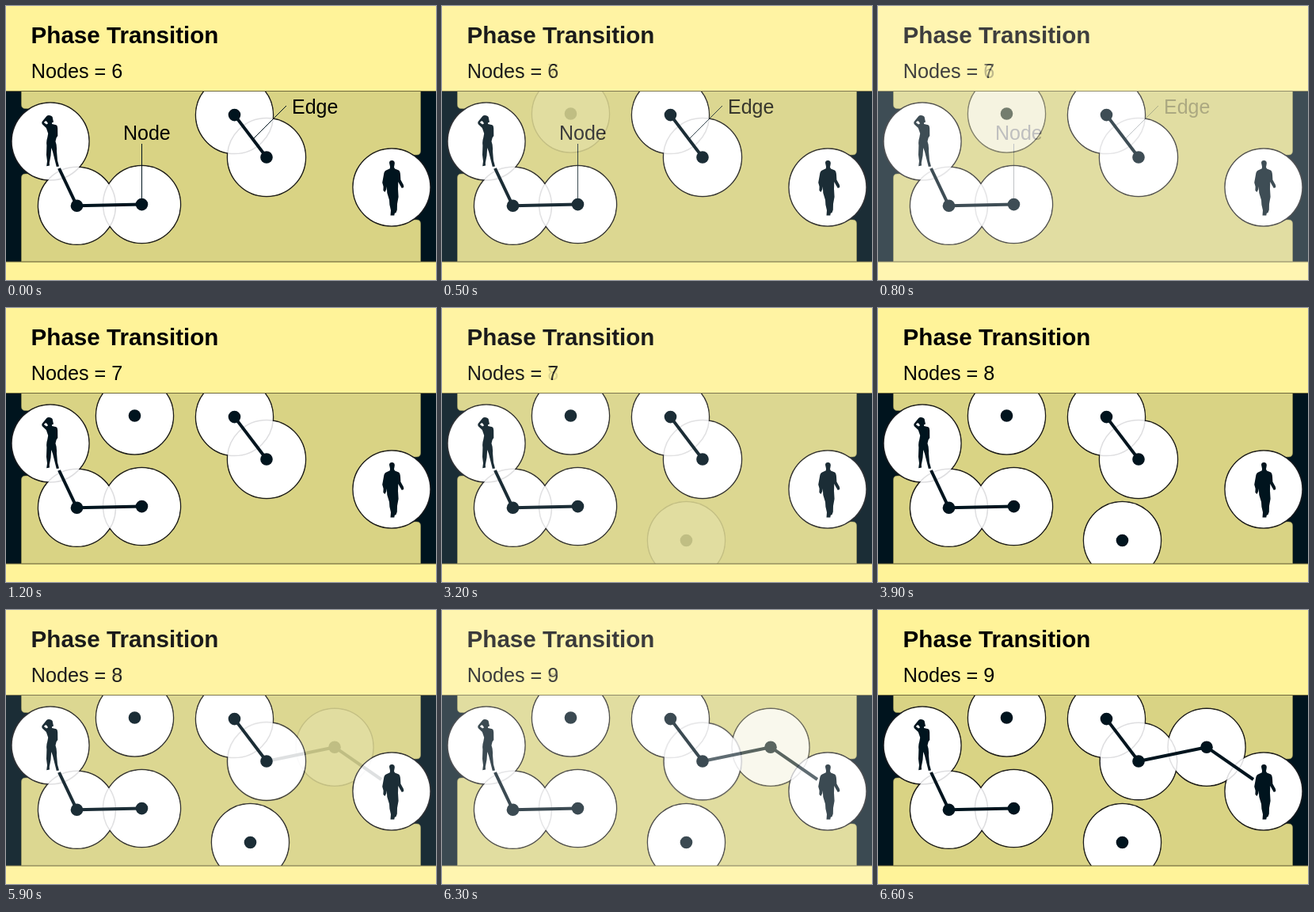
An HTML page that plays this animation: 543x346 px, repeating every 8 s.

```html
<!DOCTYPE html>
<html lang="en">
<head>
<meta charset="utf-8">
<title>Phase Transition</title>
<style>
  html, body { margin: 0; width: 100%; height: 100%; overflow: hidden; background: #fff; }
  svg { display: block; width: 543px; height: 346px; }
  text { font: 25.2px "Liberation Sans", Arial, sans-serif; }
  .title { font-size: 29.6px; font-weight: bold; }
  .label { font-size: 25px; }
</style>
</head>
<body>
<svg id="stage" viewBox="0 0 543 346"></svg>
<script>
const INK = '#00141e', YELLOW = '#fff399', KHAKI = '#d9d384', PALE = '#dedee0';
const LOOP = 8000, STEP = 100, STEPS = 8, FADES = [500, 3200, 5900];
const stage = document.getElementById('stage');

const people = [[56, 171], [487, 229]];
const nodes = [[89.5, 252.3], [171.5, 250.6], [288.5, 137.6], [329, 191],
  [162.5, 136], [308.5, 293.5], [415, 173.2]];
const edges = [[[67, 205], nodes[0]], [nodes[0], nodes[1]], [nodes[2], nodes[3]]];
const lateEdges = [[nodes[3], nodes[6]], [nodes[6], [474, 214]]];

const woman = `M50.5 140Q52 137.4 55.5 138.2Q59 138.7 59 142L60 146.5L58 147.5
  L58 149L63.5 150.2Q65.3 151 65.2 155L65.3 164L63.6 166.5L62.5 171
  Q64.5 176 64 183L65 195L67 202.5L63.8 203L62 196L59 184L57.2 179
  L56.5 189L54.8 198L55 201.5L51.2 202.3L52 196L51 188L51.4 176
  Q50.6 171 52.3 166L53.2 161L50.8 154L46 149.5Q44.5 147.5 46 145.5
  L49.3 141.5ZM47.8 147L51 149.5L53 148.5L52 146.5L50.2 145Z`;
const man = `M484 198Q484.2 194.8 487.5 195Q491 195.2 490.8 199L490 203.5L491 205.5
  L496 207.5Q497.7 208.5 498 213L498.4 219.5L502 226L502.3 229L499.8 230
  L497.7 226.5L495.3 222L495 231L495.6 241L494 250L493.8 257.5L492.5 261
  L490.8 261.8L490.3 264.5L485.5 264.5L486 258L484.4 251L484 245L481.3 236
  L480.8 228L480.3 231.5L478.5 235L476.4 233L476.6 228L475.2 223L477 213
  Q477.4 208.7 480 207.5L484.8 205.2L485 202.8Z`;

const line = ([a, b], width) =>
  `<path d="M${a}L${b}" stroke="${INK}" stroke-width="${width}"/>`;
const disc = ([x, y, r], attrs) => `<circle cx="${x}" cy="${y}" r="${r}" ${attrs}/>`;

// Outlines turn pale wherever one disc lies inside another.
function discs(list, id) {
  const each = attrs => list.map(c => disc(c, attrs)).join('');
  let inner = '';
  list.forEach((a, i) => list.forEach((b, j) => {
    if (i === j || Math.hypot(a[0] - b[0], a[1] - b[1]) > a[2] + b[2]) return;
    const clip = `${id}-${i}-${j}`;
    inner += `<clipPath id="${clip}">${disc([b[0], b[1], b[2] - 0.7], '')}</clipPath>` +
      disc(a, `fill="none" stroke="${PALE}" stroke-width="1.5" clip-path="url(#${clip})"`);
  }));
  const fills = list.map(([x, y, r]) => disc([x, y, r - 0.7], 'fill="#fff"')).join('');
  return each(`fill="none" stroke="#1a1a1e" stroke-width="1.5"`) + fills + inner;
}

function scene(index) {
  const shown = nodes.slice(0, 4 + index);
  const links = index === 3 ? edges.concat(lateEdges) : edges;
  const circles = people.concat(shown).map(c =>
    [...c, c === nodes[3] ? (index === 3 ? 48.8 : 49.5) : 49]);
  const labels = index ? '' : `
    <text class="label" x="148" y="169">Node</text>
    <text class="label" x="361" y="136">Edge</text>
    ${line([[171.5, 174], [171.5, 250]], 1)}${line([[354, 126], [313, 167]], 1)}`;
  return `<g>
    <rect width="543" height="346" fill="${YELLOW}"/>
    <rect y="107.5" width="543" height="215.5" fill="${INK}"/>
    <path fill="${KHAKI}" stroke="#a39d58" stroke-width=".6" d="M19.5 107.5H523.5V183
      Q523.5 188 518.5 188H487V270H518.5Q523.5 270 523.5 275V323H19.5V217
      Q19.5 212 24.5 212H56V129.5H24.5Q19.5 129.5 19.5 124.5Z"/>
    <g clip-path="url(#band)">${discs(circles, 's' + index)}</g>
    <path d="M0 107.5H543M0 323H543" stroke="#6e693c"/>
    ${links.map(e => line(e, 4)).join('')}
    ${shown.map(([x, y]) => disc([x, y, 7.8], `fill="${INK}"`)).join('')}
    <path d="${woman}${man}" fill="${INK}"/>
    <text class="title" x="31.6" y="47">Phase Transition</text>
    <text x="31.8" y="91">Nodes = ${6 + index}</text>
    ${labels}</g>`;
}

stage.innerHTML =
  '<clipPath id="band"><rect y="107.5" width="543" height="215.5"/></clipPath>' +
  [0, 1, 2, 3].map(scene).join('');
const scenes = [...stage.children].slice(1);

function render(time) {
  const t = time % LOOP;
  const progress = start =>
    t < start ? 0 : Math.min(1, (Math.floor((t - start) / STEP) + 1) / STEPS);
  const arrived = [1, ...FADES.map(progress), 0];
  // Old and new scenes overlap over white, which washes the colours mid-fade.
  scenes.forEach((g, i) => {
    const opacity = arrived[i] * (1 - arrived[i + 1]);
    g.setAttribute('opacity', opacity);
    g.setAttribute('display', opacity ? 'inline' : 'none');
  });
}

const begin = performance.now();
function tick() {
  render(performance.now() - begin);
  requestAnimationFrame(tick);
}
tick();
</script>
</body>
</html>
```
